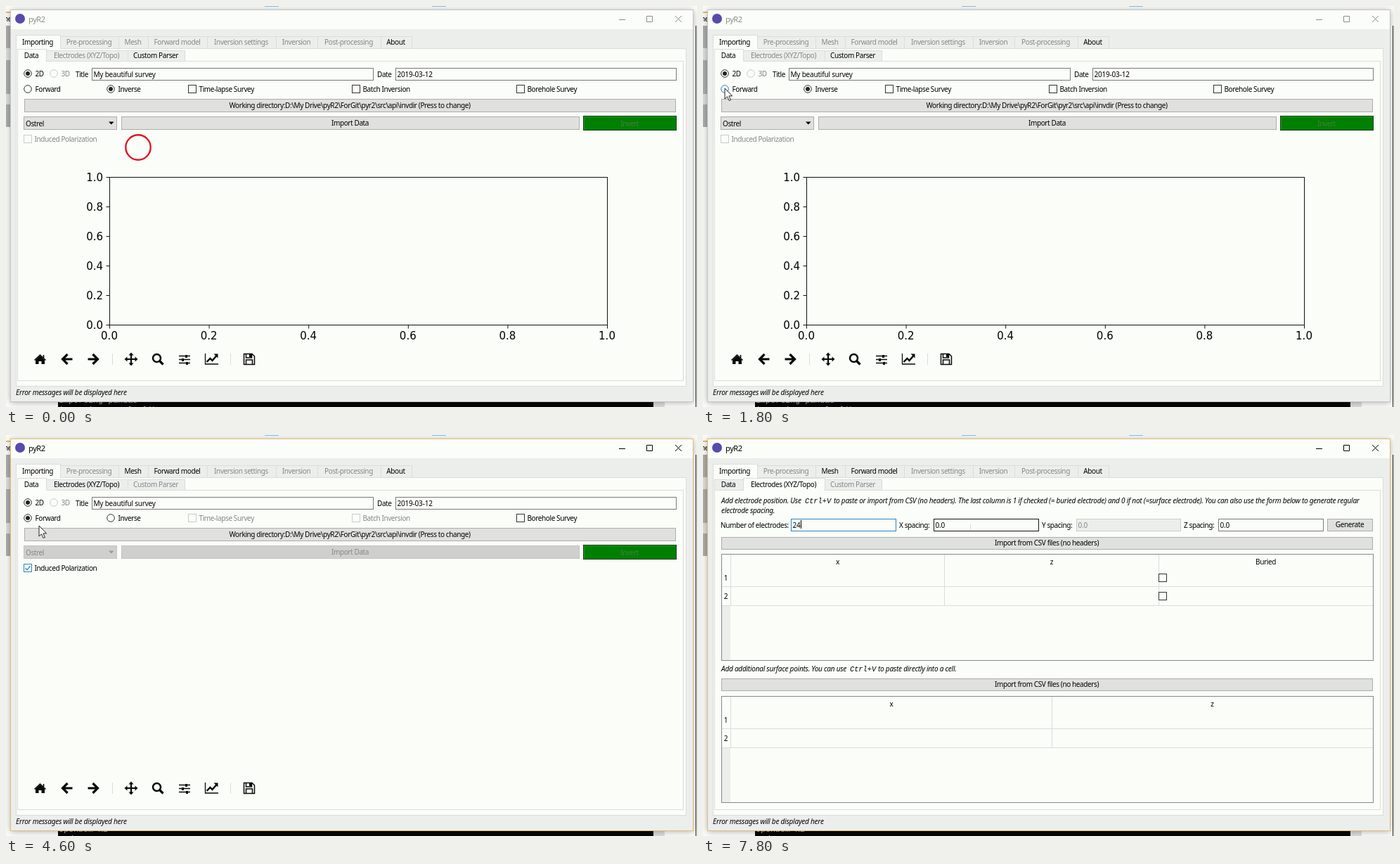
Write an HTML page with a canvas that moves like this. It is 983x570 px and loops after 8000 ms.

```html
<!DOCTYPE html>
<html lang="en">
<head>
<meta charset="utf-8">
<title>pyR2 forward setup</title>
<style>
  html, body { margin: 0; width: 100%; height: 100%; overflow: hidden; background: #fcfdf9; }
  canvas { display: block; }
</style>
</head>
<body>
<canvas id="stage" width="983" height="570"></canvas>
<script>
const ctx = document.getElementById('stage').getContext('2d');
const LOOP = 8000, STEP = 200;
const PANEL = '#fbfdf8', CHROME = '#eceeec', LINE = '#dcdcdc';
const INK = '#000000', DISABLED = '#868686', BLUE = '#2a86c8', FIELD = '#7a7a7a';
const UI = '"Noto Sans", "Open Sans", sans-serif';

// Pointer stops: time, x, y
const PATH = [
  [200, 188, 201], [1200, 80, 129], [1800, 31, 117], [3200, 31, 117],
  [3800, 30, 187], [4400, 30, 187], [4600, 47, 129], [5000, 87, 66],
  [5600, 87, 66], [6400, 158, 130], [7200, 158, 130], [7800, 380, 130]
];

function pointerAt(t) {
  const i = PATH.findIndex(p => p[0] >= t);
  if (i < 1) return PATH[i < 0 ? PATH.length - 1 : 0].slice(1);
  const [t0, x0, y0] = PATH[i - 1], [t1, x1, y1] = PATH[i];
  const u = (t - t0) / (t1 - t0), k = u * u * (3 - 2 * u);
  return [x0 + (x1 - x0) * k, y0 + (y1 - y0) * k];
}

function fill(x, y, w, h, color) {
  ctx.fillStyle = color;
  ctx.fillRect(x, y, w, h);
}

// The border pixels lie on x, y, right and bottom
function box(x, y, right, bottom, border, background) {
  if (background) fill(x, y, right - x + 1, bottom - y + 1, background);
  ctx.strokeStyle = border;
  ctx.lineWidth = 1;
  ctx.strokeRect(x + .5, y + .5, right - x, bottom - y);
}

// y is the visual middle of the line
function text(str, x, y, { color = INK, align = 'left', font = '10px ' + UI, spacing = -.4 } = {}) {
  ctx.font = font;
  ctx.letterSpacing = spacing + 'px';
  ctx.textAlign = align;
  ctx.fillStyle = color;
  ctx.fillText(str, x, y + 3.5);
}

const italic = (str, x, y) => text(str, x, y, { font: 'italic 10px ' + UI, spacing: -.23 });
const code = (str, x, y) =>
  text(str, x, y, { font: 'italic 10.3px "Liberation Mono", monospace', spacing: 0 });

function path(d, color, width) {
  const p = new Path2D(d);
  if (width) {
    ctx.strokeStyle = color;
    ctx.lineWidth = width;
    ctx.stroke(p);
  } else {
    ctx.fillStyle = color;
    ctx.fill(p);
  }
}

function circle(x, y, r, color, width) {
  ctx.beginPath();
  ctx.arc(x, y, r, 0, 7);
  ctx.lineWidth = width || 1;
  ctx.strokeStyle = ctx.fillStyle = color;
  width ? ctx.stroke() : ctx.fill();
}

function button(label, x, y, right, bottom, { enabled = true, hover = false } = {}) {
  box(x, y, right, bottom, hover ? '#6f9fc4' : enabled ? '#adadad' : '#c4c4c4',
    hover ? '#dfe9ef' : enabled ? '#e0e1de' : '#cfd0cd');
  text(label, (x + right) / 2, (y + bottom) / 2, { align: 'center', color: enabled ? INK : DISABLED });
}

function field(value, x, right, y, bottom, { border = FIELD, enabled = true } = {}) {
  box(x, y, right, bottom, enabled ? border : '#cccccc', enabled ? PANEL : CHROME);
  text(value, x + 2.5, (y + bottom) / 2 + .5, { color: enabled ? INK : DISABLED, spacing: -.2 });
}

function radio(label, x, y, on, { enabled = true, hover = false } = {}) {
  circle(x, y, 5.3, hover ? BLUE : enabled ? '#333333' : '#cccccc', 1);
  if (on) circle(x, y, 3, '#222222');
  text(label, x + 10.5, y + .5, { color: enabled ? INK : DISABLED });
}

function check(label, x, y, { enabled = true, on = false, hover = false } = {}) {
  box(x, y - 6, x + 11, y + 5, hover ? BLUE : enabled ? '#333333' : '#cccccc');
  if (on) path(`M${x + 2.5} ${y}l2.5 2.8 4.5-5.6`, hover ? BLUE : '#222222', 1.3);
  text(label, x + 15.5, y + .5, { color: enabled ? INK : DISABLED });
}

function tabs(edges, labels, top, bottom, active, isEnabled) {
  labels.forEach((label, i) => {
    const on = i === active, left = edges[i], right = edges[i + 1];
    box(left, top + (on ? 0 : 2), right, bottom, LINE, on ? PANEL : CHROME);
    if (on) fill(left + 1, bottom - 1, right - left - 1, 3, PANEL);
    text(label, (left + right) / 2 - .5, (top + bottom) / 2 + .5,
      { align: 'center', color: isEnabled(i) ? INK : DISABLED });
  });
}

function backdrop(t) {
  fill(0, 0, 983, 570, '#fcfdf9');
  fill(368, 0, 20, 1, '#7cc4ee');
  fill(606, 0, 20, 1, '#7cc4ee');
  fill(0, 8, 6, 2, '#e9b860');
  text('ne', -3, 18);
  fill(0, 28, 6, 144, '#dededc');
  [[28, 32], [77, 48], [140, 32]].forEach(([y, h]) => fill(0, y, 6, h, '#adadad'));
  fill(981, 28, 1, 542, '#222222');

  fill(74, 560, 847, 10, '#050505');
  fill(921, 560, 16, 10, '#dcdcdc');
  const lines = t < 2000 ? ['importing pandas', 'importing matplotlib']
    : t < 3000 ? ['working directory is: D:\\My Drive\\pyR2\\ForGit\\pyr2\\src\\api\\invdir', 'clearing the dir']
    : ['Openbsm R2', '  done'];
  const mono = { font: '11.7px "Liberation Mono", monospace', spacing: 0, color: '#b4b4b4' };
  lines.forEach((line, i) => text(line, 75, 560.5 + 13 * i, mono));
}

function frameWindow(active) {
  ctx.save();
  ctx.shadowColor = 'rgba(0, 0, 0, .3)';
  ctx.shadowBlur = 9;
  ctx.shadowOffsetY = 1;
  fill(6, 5, 972, 558, CHROME);
  ctx.restore();
  box(6, 5, 977, 562, active ? '#e2bd78' : '#c3c5ca');
  fill(7, 6, 970, 27, PANEL);
  circle(20, 18, 7, '#574bab');
  const ink = active ? INK : '#8c8c8c';
  text('pyR2', 32, 19, { color: ink, font: '11px ' + UI });
  path('M872 19.5h9M911.5 14.5h8v8h-8zM952 14l9 9M961 14l-9 9', ink, 1);
  italic('Error messages will be displayed here', 14, 549);
}

function toolbar() {
  const ink = '#080808';
  fill(151, 494, 1, 16, LINE);
  fill(319, 494, 1, 16, LINE);
  path('M42 503l6.5-6 6.5 6v6h-4.5v-4h-4v4H42z', ink);
  path('M40.5 503.5l8-7.5 8 7.5M53.5 496v4', ink, 1.6);
  path('M87.5 495l-7 7 7 7M81 502h13.5', ink, 3.2);
  path('M123.5 495l7 7-7 7M130 502h-13.5', ink, 3.2);
  path('M178 495v14M171 502h14', ink, 2.2);
  path('M178 492.5l3.5 4h-7zM178 511.5l3.5-4h-7zM168.5 502l4-3.5v7zM187.5 502l-4-3.5v7z', ink);
  circle(214.5, 500.5, 5.5, ink, 2.5);
  path('M218.5 504.5l5 5', ink, 3.2);
  path('M246 497.5h16M246 502.5h16M246 507.5h16', ink, 1.6);
  [[255, 496], [250, 501], [256, 506]].forEach(([x, y]) => fill(x, y, 3, 4, ink));
  path('M283.5 494v15h18.5', ink, 1.3);
  path('M285.5 506l5-5 3 3 6-7', ink, 2.4);
  path('M301.5 494.5v6l-6-6z', ink);
  path('M338.5 494.5h11.5l3.5 3.5v11.5h-15zM341.5 495v5h8v-5M341.5 509v-6h9v6', ink, 1.5);
  fill(346, 495, 3, 4, ink);
}

function plot() {
  const x0 = 147.5, x1 = 855.5, y0 = 453.5, y1 = 243.5;
  const font = '15px "DejaVu Sans", sans-serif';
  ctx.strokeStyle = '#111111';
  ctx.lineWidth = 1;
  ctx.strokeRect(x0, y1, x1 - x0, y0 - y1);
  for (let i = 0; i <= 5; i++) {
    const x = x0 + (x1 - x0) * i / 5, y = y0 + (y1 - y0) * i / 5, label = (i / 5).toFixed(1);
    path(`M${x} ${y0}v5M${x0} ${y}h-5`, '#111111', 1);
    text(label, x - .5, 470, { font, spacing: 0, align: 'center' });
    text(label, 138, y + 1.7, { font, spacing: 0, align: 'right' });
  }
}

function dataTab(t) {
  const forward = t >= 3000, inverse = !forward;
  radio('2D', 31, 96, true);
  radio('3D', 68, 96, false, { enabled: false });
  text('Title', 99, 97);
  field('My beautiful survey', 122, 522, 88, 105);
  text('Date', 528, 97);
  field('2019-03-12', 554, 953, 88, 105);

  radio('Forward', 31, 118, forward, { hover: t >= 1800 && t < 3400 });
  radio('Inverse', 149, 118, inverse);
  check('Time-lapse Survey', 259, 118, { enabled: inverse });
  check('Batch Inversion', 492, 118, { enabled: inverse });
  check('Borehole Survey', 726, 118);

  button('Working directory:D:\\My Drive\\pyR2\\ForGit\\pyr2\\src\\api\\invdir (Press to change)',
    26, 132, 952, 150, { hover: t >= 1000 && t < 1400 });

  button('', 25, 157, 157, 175, { enabled: inverse, hover: t >= 800 && t < 1400 });
  text('Ostrel', 28, 167, { color: inverse ? INK : DISABLED });
  path('M146 164.5h7.5l-3.7 4z', inverse ? INK : '#999999');
  button('Import Data', 164, 157, 815, 175, { enabled: inverse });
  box(821, 156, 953, 176, '#0b3d0b', '#008000');
  path('M822.5 176v-18.5h130', '#2c962c', 1);
  text('Invert', 887, 167, { align: 'center', color: '#4d7a45' });

  check('Induced Polarization', 25, 189, { enabled: forward, on: t >= 4200, hover: t >= 3800 });
  if (inverse) plot();
  toolbar();
}

function table(top, splits, headers, bottom) {
  box(26, top, 953, bottom, '#85888c', PANEL);
  fill(27, top + 74, 12, bottom - top - 74, CHROME);
  splits.slice(0, -1).forEach((x, i) => {
    fill(x, top + 1, 1, 72, LINE);
    text(headers[i], (x + splits[i + 1]) / 2 + .5, top + 11, { align: 'center' });
  });
  [1, 2].forEach(row => {
    fill(27, Math.floor(top + 20.5 + row * 26.3), 926, 1, LINE);
    text(row, 32.5, top + 8 + row * 26.3, { align: 'center' });
  });
}

function electrodesTab(t, [px, py]) {
  const border = (x, right, rest) =>
    px >= x && px <= right && py >= 119 && py <= 136 ? '#151515' : rest;

  italic('Add electrode position. Use', 26, 93);
  code('Ctrl+V', 145, 93);
  italic('to paste or import from CSV (no headers). The last column is 1 if checked (= buried electrode) '
    + 'and 0 if not (=surface electrode). You can also use the form below to generate regular', 186, 93);
  italic('electrode spacing.', 26, 107);

  const count = t < 7000 ? '' : t < 7200 ? '2' : '24';
  text('Number of electrodes:', 25, 128);
  field(count, 125, 274, 119, 136, { border: border(125, 274, BLUE) });
  fill(128 + count.length * 5.5, 121, 1, 12, INK);
  text('X spacing:', 279, 128);
  field('0.0', 328, 477, 119, 136, { border: border(328, 477, FIELD) });
  text('Y spacing:', 482, 128);
  field('0.0', 531, 679, 119, 136, { enabled: false });
  text('Z spacing:', 684, 128);
  field('0.0', 733, 882, 119, 136);
  button('Generate', 888, 119, 952, 136);

  button('Import from CSV files (no headers)', 26, 145, 952, 162);
  table(169, [39, 343, 648, 952], ['x', 'z', 'Buried'], 320);
  check('', 648, 203);
  check('', 648, 229);

  italic('Add additional surface points. You can use', 26, 332);
  code('Ctrl+V', 209, 332);
  italic('to paste directly into a cell.', 249, 332);
  button('Import from CSV files (no headers)', 26, 346, 952, 363);
  table(371, [39, 496, 952], ['x', 'z'], 522);
}

function pointer(t, [x, y]) {
  if (t < 200) return circle(188, 201, 17.7, '#dc1820', 2.4);
  const overField = t > 5600 && y > 118 && (x > 124 && x < 275 || x > 327);
  if (overField) return fill(Math.round(x), 127, 1, 8, '#d9dad2');
  const arrow = `M${x} ${y}v15l3.5-3.2 2.7 5.7 2.3-1-2.6-5.6h4.8z`;
  path(arrow, '#ffffff');
  path(arrow, '#222222', 1);
}

function draw(t) {
  const pos = pointerAt(t), forward = t >= 3000, electrodes = t >= 5200;
  backdrop(t);
  frameWindow(t >= 2600);

  box(14, 60, 967, 540, LINE, PANEL);
  tabs([14, 77, 160, 202, 286, 384, 443, 533, 577],
    ['Importing', 'Pre-processing', 'Mesh', 'Forward model', 'Inversion settings', 'Inversion',
      'Post-processing', 'About'],
    41, 60, 0, i => i === 0 || i === 7 || forward && (i === 2 || i === 3));

  box(16, 78, 963, 532, LINE, PANEL);
  tabs([16, 57, 173, 254], ['Data', 'Electrodes (XYZ/Topo)', 'Custom Parser'],
    61, 78, electrodes ? 1 : 0, i => i === 0 || (i === 1) === forward);

  if (electrodes) electrodesTab(t, pos);
  else dataTab(t);
  pointer(t, pos);
}

function tick() {
  const t = performance.now() % LOOP;
  draw(Math.floor(t / STEP) * STEP);
  requestAnimationFrame(tick);
}
tick();
</script>
</body>
</html>
```
